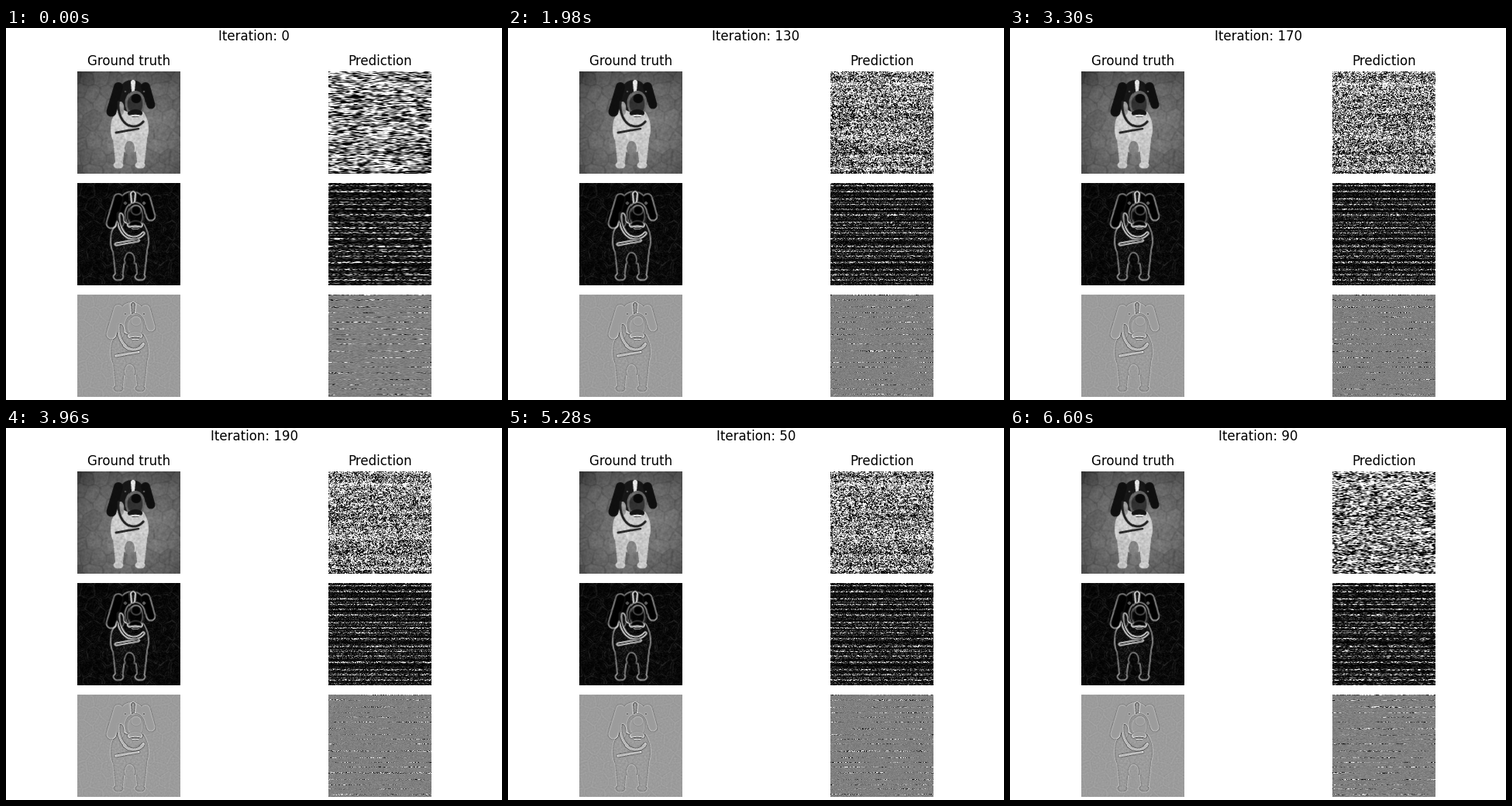
A matplotlib script for the animation above (6.93 s loop, 640 by 480 pixels).

```python
import numpy as np
import matplotlib.pyplot as plt
from matplotlib.animation import FuncAnimation

WIDTH, HEIGHT = 640, 480
SIZE = 132
SCALE = 3  # supersampling of the drawn picture
INTERVAL = 330

fine = (np.arange(SIZE * SCALE) + 0.5) / SCALE
FX, FY = np.meshgrid(fine, fine)
ROWS = np.arange(SIZE)[:, None]


def blur(img, sx, sy):
    """Separable Gaussian blur with edge padding."""
    for axis, sigma in ((1, sx), (0, sy)):
        half = int(np.ceil(3 * sigma))
        kernel = np.exp(-0.5 * (np.arange(-half, half + 1) / sigma) ** 2)
        kernel /= kernel.sum()
        pad = [(0, 0), (0, 0)]
        pad[axis] = (half, half)
        img = np.apply_along_axis(np.convolve, axis, np.pad(img, pad, mode="edge"),
                                  kernel, mode="valid")
    return img


def ellipse(img, cx, cy, rx, ry, tone):
    img[((FX - cx) / rx) ** 2 + ((FY - cy) / ry) ** 2 < 1] = tone


def limb(img, x0, y0, r0, x1, y1, r1, tone):
    """Round-ended bar whose radius goes from r0 to r1."""
    dx, dy = x1 - x0, y1 - y0
    t = np.clip(((FX - x0) * dx + (FY - y0) * dy) / (dx ** 2 + dy ** 2), 0, 1)
    img[np.hypot(FX - x0 - t * dx, FY - y0 - t * dy) < r0 + t * (r1 - r0)] = tone


def arc(img, cx, cy, rx, ry, start, end, width, tone):
    for a in np.radians(np.linspace(start, end, 60)):
        ellipse(img, cx + rx * np.cos(a), cy + ry * np.sin(a), width / 2, width / 2, tone)


def paving():
    """Grey stones with dark joints, darker towards the corners."""
    rng = np.random.default_rng(4)
    first = np.full(FX.shape, np.inf)
    second = first.copy()
    stone = np.zeros(FX.shape)
    for row in range(-1, 9):
        for col in range(-1, 8):
            cx = (col + 0.5 * (row % 2) + rng.uniform(0.1, 0.9)) * 20
            cy = (row + rng.uniform(0.25, 0.75)) * 17
            dist = np.hypot(FX - cx, FY - cy)
            stone[dist < first] = rng.normal(0, 0.015)
            second = np.minimum(second, np.maximum(first, dist))
            first = np.minimum(first, dist)
    r2 = ((FX - 70) ** 2 + (FY - 75) ** 2) / SIZE ** 2
    joint = np.exp(-((second - first) / 1.5) ** 2)
    return 0.46 - 0.36 * r2 + stone - 0.05 * joint


def dog_picture():
    img = paving()
    # hip, chest and front legs
    ellipse(img, 44, 92, 6, 11, 0.46)
    ellipse(img, 67, 74, 24, 31, 0.8)
    for x in (54, 81):
        limb(img, x, 88, 8, x, 116, 5, 0.76)
        ellipse(img, x - 1, 121, 6.5, 4.5, 0.78)
    ellipse(img, 67, 99, 6, 9, 0.5)
    # head, ears and blaze
    ellipse(img, 70, 32, 18, 21, 0.09)
    limb(img, 53, 20, 6, 44, 52, 6.5, 0.06)
    limb(img, 87, 20, 6, 94, 43, 5.5, 0.06)
    ellipse(img, 56, 48, 4.5, 9, 0.6)
    limb(img, 71, 14, 3, 71, 25, 2, 0.93)
    # face
    ellipse(img, 74, 41, 12.5, 16, 0.4)
    ellipse(img, 74, 42, 9.5, 13, 0.2)
    ellipse(img, 75, 35, 6.5, 6, 0.04)
    for x in (62, 85):
        ellipse(img, x, 26, 1.3, 1, 0.4)
    ellipse(img, 74, 54, 9, 5, 0.08)
    ellipse(img, 74, 57, 7, 1.2, 0.9)
    # collar and strap
    arc(img, 72, 44, 19, 27, 190, 50, 3, 0.12)
    limb(img, 50, 79, 1.5, 78, 74, 1.2, 0.14)

    img = img.reshape(SIZE, SCALE, SIZE, SCALE).mean(axis=(1, 3))
    grain = np.random.default_rng(8).normal(size=img.shape)
    return blur(img * (1 + 0.12 * blur(grain, 0.8, 0.8)), 0.45, 0.45)


def edges(img):
    dy, dx = np.gradient(blur(img, 0.5, 0.5))
    return 0.85 * np.tanh(4 * np.hypot(dx, dy))


def laplacian(img):
    p = np.pad(blur(img, 0.4, 0.4), 1, mode="edge")
    lap = p[2:, 1:-1] + p[:-2, 1:-1] + p[1:-1, 2:] + p[1:-1, :-2] - 4 * p[1:-1, 1:-1]
    return np.clip(0.61 + 0.42 * lap, 0, 1)


def streaks(rng, sx, sy):
    n = blur(rng.normal(size=(SIZE, SIZE)), sx, sy)
    return n / n.std()


def comb(y, period, width):
    """Narrow bumps repeated along y."""
    gap = (y + 1.2 * np.sin(y * 0.21)) % period - period / 2
    return np.exp(-(gap / width) ** 2)


row_rng = np.random.default_rng(21)
ROW_TONE = blur(row_rng.normal(size=(SIZE, 1)), 0.2, 1.5)
ROW_GAIN = 0.1 + 0.4 * row_rng.random((SIZE, 1)) ** 2


def prediction(step):
    """Value, slope and curvature pictures of the network at a training step."""
    rng = np.random.default_rng(100 + step)
    # streaks shorten quickly, then lengthen again around step 95
    reach = 0.5 + 1.7 * np.exp(-step / 12) + 0.8 * np.exp(-((step - 95) / 18) ** 2)

    value = 0.52 + 0.4 * streaks(rng, reach, 0.45) + 0.25 * ROW_TONE

    gain = ROW_GAIN + 0.75 * comb(ROWS, 7.6, 0.95)
    slope = 0.65 * gain * np.abs(streaks(rng, 0.6 * reach + 0.3, 0.3)) - 0.02

    dashes = np.clip(0.5 + 0.5 * streaks(rng, 6, 0.8), 0, 1.5)
    curve = streaks(rng, 0.3 * reach + 0.25, 0.2)
    curve = 0.5 + curve * (0.025 + 0.32 * dashes * comb(ROWS + 2, 7.1, 0.6))
    return [np.clip(img, 0, 1) for img in (value, slope, curve)]


steps = sorted(range(0, 200, 10), key=str)  # alphabetical order
steps.insert(0, 0)  # the first picture is held twice as long

fig = plt.figure(figsize=(WIDTH / 100, HEIGHT / 100), dpi=100)
title = fig.text(0.5, 1 - 16 / HEIGHT, "", fontsize=12, ha="center", va="baseline")


def column(left, name, images):
    """Stack three pictures under a heading and return their artists."""
    artists = []
    for row, img in enumerate(images):
        bottom = HEIGHT - (56 + 144 * row + SIZE)
        ax = fig.add_axes([left / WIDTH, bottom / HEIGHT, 133 / WIDTH, SIZE / HEIGHT])
        ax.axis("off")
        artists.append(ax.imshow(img, cmap="gray", vmin=0, vmax=1, aspect="auto",
                                 interpolation="nearest"))
        if row == 0:
            ax.set_title(name, fontsize=12)
    return artists


dog = dog_picture()
column(92, "Ground truth", [dog, edges(dog), laplacian(dog)])
panels = column(416, "Prediction", prediction(0))


def update(i):
    title.set_text(f"Iteration: {steps[i]}")
    for panel, img in zip(panels, prediction(steps[i])):
        panel.set_data(img)
    return [title, *panels]


anim = FuncAnimation(fig, update, frames=len(steps), interval=INTERVAL,
                     repeat=True, repeat_delay=0, blit=False)
plt.show()
```
